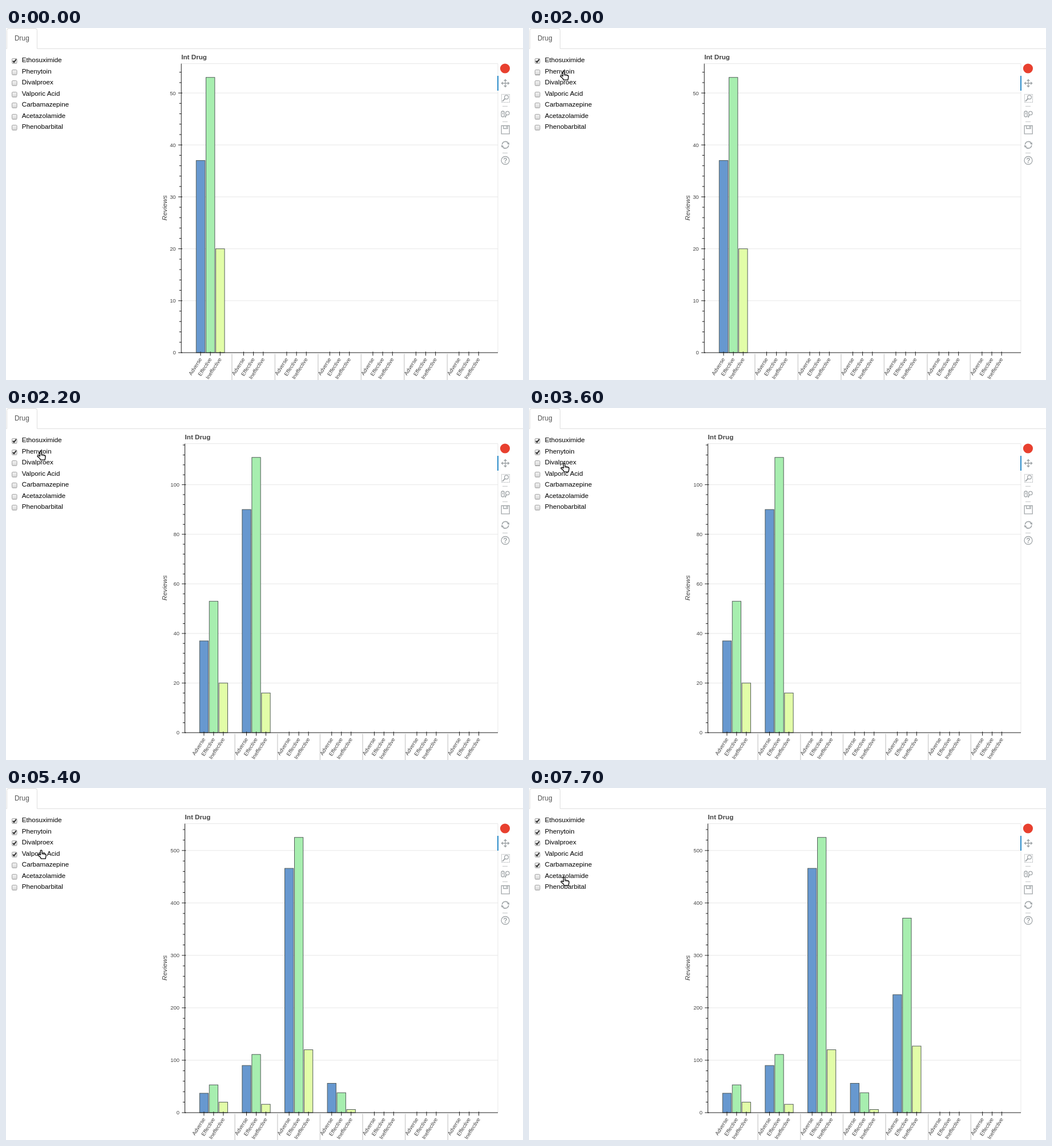
These frames come from a looping animation (906 by 618 pixels, 8000 ms). An HTML page:

```html
<!DOCTYPE html>
<html lang="en">
<head>
<meta charset="utf-8">
<title>Drug reviews</title>
<style>
  html, body { margin: 0; width: 100%; height: 100%; overflow: hidden; background: #fff; }
  svg { display: block; width: 906px; height: 618px; font-family: "Liberation Sans", Arial, sans-serif; }
  .label { font-size: 11.7px; fill: #000; }
  .tab { font-size: 11.9px; fill: #555; }
  .title { font-size: 11.7px; font-weight: bold; fill: #444; }
  .axis { font-size: 11.7px; font-style: italic; fill: #444; text-anchor: middle; }
  .tick { font-size: 9.4px; fill: #444; text-anchor: end; }
  .grid { stroke: #e7e7e7; fill: none; }
  .line { stroke: #1c1c1c; fill: none; }
  .tool { stroke: #a1a6a9; fill: none; stroke-width: 1.3; }
  .solid { fill: #a1a6a9; }
</style>
</head>
<body>
<svg id="stage" viewBox="0 0 906 618">
  <defs>
    <linearGradient id="box" x2="0" y2="1">
      <stop offset="0" stop-color="#f2f2f2"/><stop offset="1" stop-color="#d9d9d9"/>
    </linearGradient>
    <g id="hand" stroke="#000" stroke-linejoin="round">
      <path fill="#fff" stroke-width="1.3" d="M5.3 2.2Q6.7 .2 8.1 2.2V6.6L13 7.6Q15.4 8.2 15.2 10.6L14.2 16.2H6.4L5.3 13.6 1.3 10.2Q.6 8.3 2.4 8.3L5.3 9.6Z"/>
      <path fill="none" stroke-width=".8" d="M8.1 7v2.2M10.5 7.6v1.8M12.9 8v1.8"/>
    </g>
    <path id="arrow" fill="#000" stroke="#fff" stroke-width="1" d="M.5 .5V16L4.2 12.6 6.8 18.8 9.2 17.8 6.6 11.8H11.6Z"/>
  </defs>

  <path d="M0 36.2H1.5V4.5Q1.5 .7 5 .7H51Q54.5 .7 54.5 4.5V36.2H906" fill="none" stroke="#ddd"/>
  <text class="tab" x="15" y="22">Drug</text>
  <g id="list"></g>
  <g id="chart"></g>

  <circle cx="874.5" cy="71" r="8.6" fill="#e8402f"/>
  <rect x="861" y="84" width="2" height="26" fill="#2b8cc9"/>
  <g class="tool">
    <path d="M868.5 97H881.5M875 90.5V103.5"/>
    <path class="solid" stroke="none" d="M875 89.5l3 3.4h-6zM875 104.5l3-3.4h-6zM867.4 97l3.4-3v6zM882.6 97l-3.4-3v6z"/>
    <rect x="868.5" y="116.5" width="14" height="14" stroke-dasharray="1.5 1.3" stroke-width="1"/>
    <circle cx="877" cy="121.5" r="3.4"/><path d="M874.6 124L870 128.6" stroke-width="1.9"/>
    <path d="M870 137.5h9M870 164.5h9M870 219.5h9" stroke="#d3d5d6"/>
    <rect x="868" y="146" width="5.2" height="10" rx="2.6"/><path d="M870.6 148.5v3"/>
    <circle cx="878.8" cy="149.5" r="3.2"/><path d="M877 152.2L874.6 157" stroke-width="1.8"/>
    <path d="M868.2 171.5H882.2V185.8H868.2Z"/><path d="M871.8 171.5V176.5H879V171.5M877 172.5V175"/>
    <path d="M869.5 204.5A5.7 5.7 0 0 1 880 202M880.7 206A5.7 5.7 0 0 1 870.2 208.5" stroke-width="1.7"/>
    <path class="solid" stroke="none" d="M882 205.3l-4.4-2.2 4.2-2zM868 205.2l4.4 2.2-4.2 2z"/>
    <circle cx="875" cy="232.5" r="7"/>
  </g>
  <text class="solid" x="875" y="236.8" font-size="12" font-weight="bold" text-anchor="middle">?</text>
  <use id="cursor"/>
</svg>
<script>
const LOOP = 8000, LEFT_SHIFT_AT = 2200;
const RIGHT = 862, TOP = 62.6, BOTTOM = 570;
const KINDS = ["Adverse", "Effective", "Ineffective"];
const COLORS = ["#6798cf", "#a7eeaf", "#e2fda8"];
const DRUGS = ["Ethosuximide", "Phenytoin", "Divalproex", "Valporic Acid",
  "Carbamazepine", "Acetazolamide", "Phenobarbital"];
const REVIEWS = [[37, 53, 20], [90, 111, 16], [466, 525, 120], [56, 38, 6], [225, 371, 127]];

// When each drug is pressed and then ticked
const CLICKS = [[0, 0], [2000, 2100], [3600, 3900], [5200, 5400], [6800, 7000]];

// time, shape, x, y
const MOVES = [
  [500, "arrow", 106, -1], [600, "arrow", 100, 13], [700, "arrow", 90, 31],
  [800, "arrow", 78, 49], [900, "arrow", 67, 64], [1000, "hand", 54, 75],
  [3000, "arrow", 60, 97], [3100, "hand", 55, 96],
  [4100, "arrow", 60, 102], [4300, "arrow", 60, 104], [4400, "hand", 55, 106], [4500, "hand", 55, 108],
  [5800, "arrow", 63, 122], [6000, "hand", 61, 126], [6100, "hand", 55, 130],
  [7300, "arrow", 60, 141], [7700, "hand", 55, 155]
];

const $ = id => document.getElementById(id);
const text = (cls, x, y, str, extra = "") => `<text class="${cls}" x="${x}" y="${y}" ${extra}>${str}</text>`;
const path = (cls, d) => `<path class="${cls}" d="${d}"/>`;

function listMarkup(count, pressed) {
  return DRUGS.map((name, i) => {
    const y = Math.round(53 + 19.55 * i);
    const edge = i === pressed ? "#777" : "#d8d8d8";
    const mark = i < count
      ? `<path d="M12 ${y + 4.8}l2 2.3 4-5.3" fill="none" stroke="#222" stroke-width="1.8"/>` : "";
    return `<path d="M11 ${y + 9.5}h8" stroke="${edge}"/>
      <rect x="10.5" y="${y + .5}" width="8.6" height="8.6" rx="1.6" fill="url(#box)" stroke="#a3a3a3"/>`
      + mark + text("label", 27.7, (60.2 + 19.53 * i).toFixed(1), name);
  }).join("");
}

function chartMarkup(count, left) {
  const rows = REVIEWS.slice(0, count);
  const max = Math.max(...rows.flat()) * 1.05;
  const step = max < 60 ? 10 : max < 120 ? 20 : 100;
  const toY = v => BOTTOM - v / max * (BOTTOM - TOP);
  const unit = (RIGHT - left) / 32.34;
  const groupX = g => left + unit * (1.47 + 4.4 * g);

  let grid = `M${left} ${TOP}H${RIGHT}V${BOTTOM}`;
  let ticks = `M${left} ${TOP}V${BOTTOM + .5}M${left} ${BOTTOM}H${RIGHT}`;
  let labels = "", bars = "", splits = "";

  for (let i = 0; i * step / 5 <= max; i++) {
    const v = i * step / 5, y = toY(v);
    if (i % 5) { ticks += `M${left - 3.6} ${y}H${left}`; continue; }
    if (i) grid += `M${left} ${y}H${RIGHT}`;
    ticks += `M${left - 5.3} ${y}H${left + 1.8}`;
    labels += text("tick", left - 9.6, y + 3.4, v);
  }

  DRUGS.forEach((_, g) => {
    if (g) splits += `M${groupX(g) - .7 * unit} 572V618`;
    KINDS.forEach((kind, k) => {
      const x = groupX(g) + unit * (k + .5);
      ticks += `M${x} ${BOTTOM - 1.8}V${BOTTOM + 5.3}`;
      labels += text("tick", 0, 3.2, kind, `transform="translate(${x} 579.8) rotate(-57.3)"`);
      if (g < count) {
        const y = toY(rows[g][k]);
        bars += `<rect x="${x - .45 * unit}" y="${y}" width="${.9 * unit}" height="${BOTTOM - y}"
          fill="${COLORS[k]}" stroke="#4b5553" stroke-width=".95"/>`;
      }
    });
  });

  return path("grid", grid) + bars + path("line", ticks)
    + `<path d="${splits}" stroke="#d9d9d9" stroke-width="1.8"/>` + labels
    + text("title", left, 55.2, "Int Drug");
}

let shown = "";
function draw(t) {
  const count = CLICKS.filter(c => c[1] <= t).length;
  const pressed = CLICKS.findIndex(c => c[0] <= t && t < c[1]);
  const left = t < LEFT_SHIFT_AT ? 307.2 : 313.5;
  const key = [count, pressed, left].join();
  if (key !== shown) {
    shown = key;
    const axisX = count > 1 && t < LEFT_SHIFT_AT ? 276 : 282;
    $("list").innerHTML = listMarkup(count, pressed);
    $("chart").innerHTML = chartMarkup(count, left)
      + text("axis", 0, 0, "Reviews", `transform="translate(${axisX} 315.8) rotate(-90)"`);
  }

  const move = MOVES.filter(m => m[0] <= t).pop();
  const cursor = $("cursor");
  cursor.setAttribute("visibility", move ? "visible" : "hidden");
  if (move) {
    cursor.setAttribute("href", "#" + move[1]);
    cursor.setAttribute("x", move[2]);
    cursor.setAttribute("y", move[3]);
  }
}

const start = performance.now();
function tick() {
  draw((performance.now() - start) % LOOP);
  requestAnimationFrame(tick);
}
tick();
</script>
</body>
</html>
```
